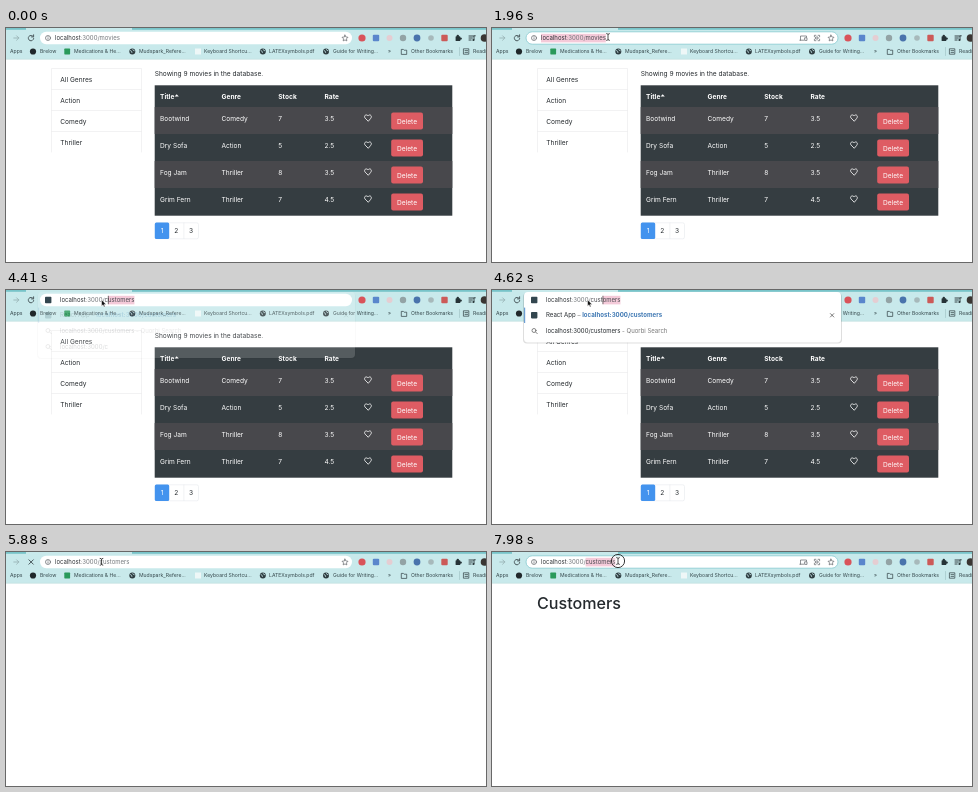
Animation of 480 by 234 pixels, one loop 8 s. Source, as an HTML page:

```html
<!DOCTYPE html>
<html lang="en">
<head>
<meta charset="utf-8">
<title>Movie list</title>
<style>
  html, body { margin: 0; width: 100%; height: 100%; overflow: hidden; background: #fff; }
  svg { display: block; width: 100%; height: 100%; }
  text { font-family: Inter, Roboto, sans-serif; fill: #24292d; white-space: pre; }
  .page text { font-size: 6.6px; }
  .page .light { fill: #fff; }
  .page .head { fill: #fff; font-weight: 700; }
  .marks text { font-size: 5.1px; fill: #34464a; }
  .omni text { font-size: 6px; }
  .omni .best { font-size: 6.1px; }
  .line { fill: none; stroke-linecap: round; stroke-linejoin: round; }
</style>
</head>
<body>
<svg viewBox="0 0 480 234" preserveAspectRatio="none">
  <rect width="480" height="234" fill="#fff"/>
  <g id="movies" class="page"></g>
  <text id="heading" x="45" y="57.2" font-size="16.1" font-weight="500">Customers</text>
  <g id="chrome" class="marks"></g>
  <g id="popup" class="omni"></g>
  <g class="omni">
    <rect id="pill" x="34" y="3.8" width="312" height="12.4" rx="6.2" fill="#fff" stroke-width=".9"/>
    <g id="info" class="line" stroke="#5f6368" stroke-width=".7"><circle cx="42" cy="10" r="2.5"/><path d="M42 9.8v1.4M42 8.6v.1"/></g>
    <rect id="favicon" x="39" y="6.8" width="6.4" height="6.4" rx=".8" fill="#33464f"/>
    <rect id="selection" y="5.8" height="8.6" fill="#f4cad9"/>
    <text id="url" y="12.1"><tspan fill="#303438">localhost</tspan><tspan fill="#73777b">:3000/</tspan><tspan id="path"></tspan></text>
    <path id="caret" class="line" stroke="#222" stroke-width=".6"/>
    <g id="pageIcons" class="line" stroke="#5f6368" stroke-width=".7">
      <path d="M308.5 12.2V8h6v1.2M307.8 12.2h3.8M313 9.8h2v2.6h-2z"/>
      <path d="M322.4 8.8V7.3h1.5M326.1 7.3h1.5v1.5M327.6 11.2v1.5h-1.5M323.9 12.7h-1.5v-1.5M324 9h2v2h-2z"/>
    </g>
    <path id="star" class="line" stroke="#5f6368" stroke-width=".7" d="M339 7.1l.9 1.9 2.1.3-1.5 1.5.3 2.1-1.8-1-1.8 1 .3-2.1-1.5-1.5 2.1-.3z"/>
  </g>
  <g class="line" stroke="#4b5a5e" stroke-width="1">
    <path id="reload" d="M27.2 8.5a2.7 2.7 0 1 0 .5 2M27.6 6.8v2.1h-2.1"/>
    <path id="stop" d="M22.9 7.8l4.4 4.4M27.3 7.8l-4.4 4.4"/>
  </g>
  <g id="pointer">
    <circle id="ring" r="6.6" fill="#fff" fill-opacity=".15" stroke="#222" stroke-width=".9"/>
    <path id="beam" class="line" stroke="#222" stroke-width=".8" d="M-1.4 -3.4q1.4 0 1.4 .8v5.2q0 .8 -1.4 .8M1.4 -3.4q-1.4 0 -1.4 .8M1.4 3.4q-1.4 0 -1.4 -.8"/>
    <path id="arrow" fill="#111" stroke="#fff" stroke-width=".5" d="M0 0v6.4l1.5-1.4 1 2.3 1.1-.5-1-2.2h2.1z"/>
  </g>
</svg>
<script>
const LOOP = 8000;
const $ = id => document.getElementById(id);
const text = (x, y, s, attrs = '') => `<text x="${x}" y="${y}" ${attrs}>${s}</text>`;
const rect = (x, y, w, h, fill, attrs = '') =>
  `<rect x="${x}" y="${y}" width="${w}" height="${h}" fill="${fill}" ${attrs}/>`;
const dot = (x, y, r, fill) => `<circle cx="${x}" cy="${y}" r="${r}" fill="${fill}"/>`;
const line = (d, color, width = .7) =>
  `<path class="line" d="${d}" stroke="${color}" stroke-width="${width}"/>`;

function moviesPage() {
  const rows = [
    ['Bootwind', 'Comedy', 7, 3.5], ['Dry Sofa', 'Action', 5, 2.5],
    ['Fog Jam', 'Thriller', 8, 3.5], ['Grim Fern', 'Thriller', 7, 4.5],
  ];
  const columns = [154, 215.5, 272.3, 318.5];
  let s = line('M45.5 124V40.5H135.5V124M45.5 61.5h90M45.5 82.5h90M45.5 103.5h90', '#ecedee');
  ['All Genres', 'Action', 'Comedy', 'Thriller'].forEach((genre, i) => s += text(54.3, 53.6 + 21 * i, genre));
  s += text(148.7, 48.3, 'Showing 9 movies in the database.');
  s += rect(148.7, 57.3, 297.6, 130.4, '#353d41');
  ['Title', 'Genre', 'Stock', 'Rate'].forEach((name, i) => s += text(columns[i], 70.9, name, 'class="head"'));
  s += '<path d="M168.6 68.6l2.1-2.3 2.1 2.3z" fill="#fff"/>';
  rows.forEach((row, i) => {
    const y = 79 + 27 * i;
    if (i % 2 === 0) s += rect(148.7, y, 297.6, 27, '#48484c');
    row.forEach((cell, c) => s += text(columns[c], y + 13.8, cell, 'class="light"'));
    s += line(`M362 ${y + 14}l-2.9-2.9c-1.8-2.3 1.2-4.5 2.9-2.2c1.7-2.3 4.7-.1 2.9 2.2z`, '#fff', .8);
    s += rect(385.2, y + 5.5, 31.8, 17, '#de5c63', 'rx="2"');
    s += text(401, y + 16.5, 'Delete', 'class="light" text-anchor="middle"');
  });
  s += rect(149.3, 194.8, 43.2, 16, '#fff', 'rx="1.8" stroke="#e6e9ec" stroke-width=".6"');
  s += line('M177.9 195v15.6', '#e6e9ec', .6);
  s += rect(148.8, 194.5, 14.4, 16.4, '#4393ee', 'rx="1.5"');
  [156, 170.3, 185].forEach((x, i) =>
    s += text(x, 205.2, i + 1, `text-anchor="middle" ${i ? '' : 'class="light"'}`));
  return s;
}

function browserFrame() {
  const ink = '#2f3d41';
  let s = rect(0, 0, 480, 31.3, '#c8e9eb') + rect(0, 0, 20, 1.8, '#78c4c9') + rect(126, 0, 354, 1.8, '#78c4c9');
  s += line('M0 31.2h480', '#b4d4d6', .5);
  s += line('M7.8 10h5M10.6 7.8l2.2 2.2-2.2 2.2', '#93acaf', .8);
  const bookmarks = [
    [4, 'Apps'], [34, 'Brelow'], [68, 'Medications &amp; He...'], [133, 'Mudspark_Refere...'],
    [198, 'Keyboard Shortcu...'], [263, 'LATEXsymbols.pdf'], [327, 'Guide for Writing...'],
    [382, '»'], [405, 'Other Bookmarks'], [467, 'Reading List'],
  ];
  bookmarks.forEach(([x, label]) => s += text(x, 25.4, label));
  s += dot(27, 23.5, 3.1, '#20282b') + rect(58.3, 20.6, 5.8, 5.8, '#2a9a5b', 'rx=".6"');
  s += rect(189, 20.5, 6, 6, '#eef7f7');
  for (const x of [126.3, 256.8, 320]) {
    s += dot(x, 23.5, 3, ink);
    s += line(`M${x - 1.8} 22.5q1.6 .3 1.5 2M${x + .4} 21.6q.2 1.2 1.5 1.2`, '#c8e9eb', .8);
  }
  s += line('M395.3 26V21.4h2l.8 .8h2.6V26z', ink) + line('M453.5 19.5v8', '#9dbfc2', .6);
  s += line('M457.8 20.8h5v5.4h-5zM459 22.6h2.6M459 24.4h2.6', ink, .7);

  // extension buttons
  s += dot(356, 10, 3.6, '#d9535a') + rect(366.8, 6.8, 6.4, 6.4, '#5a86cc', 'rx="1"');
  s += dot(383.5, 10, 3, '#e5cdd2') + dot(397, 10, 3.2, '#93a3a5') + dot(411, 10, 3.4, '#4a73ac');
  s += dot(425, 10, 2.8, '#a7b9bb') + rect(441.2, 6.8, 6.4, 6.4, '#cc5a58', 'rx="1" transform="translate(-5.9 0)"');
  s += rect(449.6, 8.3, 4.7, 4.7, '#263337', 'rx=".6"') + dot(451.8, 8, 1.2, '#263337') + dot(454.6, 10.6, 1.2, '#263337');
  s += line('M463 8h4.6M463 10h3.4M463 12h2.2M468 12V7.8h1.3', '#263337', .9) + dot(467.4, 12, 1, '#263337');
  s += dot(478.5, 10, 3.8, '#3a3532');
  return s;
}

function suggestions() {
  const address = 'localhost:3000/customers';
  const search = y => line(`M43.7 ${y + 1.6}l1.6 1.6`, '#666', .8) +
    `<circle class="line" cx="42" cy="${y}" r="2" stroke="#666" stroke-width=".8"/>`;
  return `<rect id="shadow" x="31" y="3" width="319" rx="4" fill="#000" opacity=".13"/>
    <rect id="sheet" x="32" y="2" width="317" rx="4" fill="#fff"/>` +
    rect(32, 17.6, 1.2, 15.4, '#6d9fd4') + rect(39, 22, 6.4, 6.4, '#33464f', 'rx=".8"') +
    `<text class="best" x="54" y="27.3">React App<tspan fill="#777"> – </tspan><tspan fill="#3f78b3" font-weight="700">${address}</tspan></text>` +
    line('M338.4 23.6l3.4 3.4M341.8 23.6l-3.4 3.4', '#444') + search(40.5) +
    `<text x="54" y="43.1">${address}<tspan fill="#777"> - Quorbi Search</tspan></text>` +
    `<g id="thirdRow">${search(56.5)}${text(54, 59.1, 'localhost:3000/c')}</g>`;
}

$('movies').innerHTML = moviesPage();
$('chrome').innerHTML = browserFrame();
$('popup').innerHTML = suggestions();

const show = (id, on) => $(id).style.display = on ? '' : 'none';
const within = (t, ...spans) => spans.some(([from, to]) => t >= from && t < to);
const clamp = v => Math.min(1, Math.max(0, v));

const pointerStops = [
  [70, 150, -14], [840, 116, 9], [2380, 116, 9], [2870, 95.5, 9.8],
  [6510, 95.5, 9.8], [7280, 126, 9], [LOOP, 126, 9],
];
function pointerAt(t) {
  const next = Math.max(1, pointerStops.findIndex(stop => stop[0] >= t));
  const [t0, x0, y0] = pointerStops[next - 1], [t1, x1, y1] = pointerStops[next];
  const p = clamp((t - t0) / (t1 - t0)), ease = p * p * (3 - 2 * p);
  return [x0 + (x1 - x0) * ease, y0 + (y1 - y0) * ease];
}

function render(t) {
  const typing = within(t, [4200, 5670]);
  const typed = t < 4480 ? 1 : Math.min(9, 2 + Math.floor((t - 4480) / 70));
  const [px, py] = pointerAt(t);

  show('movies', t < 5740);
  show('heading', t >= 6020);
  const loading = within(t, [5670, 6160]);
  show('stop', loading);
  show('reload', !loading);

  // address field
  const path = t < 4200 ? 'movies' : 'customers';
  if ($('path').textContent !== path) $('path').textContent = path;
  const url = $('url');
  const left = typing ? 54 : 49;
  url.setAttribute('x', left);
  const end = url.getNumberOfChars();
  const charX = i => i < end ? url.getStartPositionOfChar(i).x : url.getEndPositionOfChar(end - 1).x;
  const pathX = charX(15), endX = charX(end), typedX = charX(Math.min(end, 15 + typed));
  let from = endX;
  if (within(t, [1680, 2240], [7490, 7700])) from = left;
  else if (within(t, [2380, 4200])) from = Math.max(pathX, Math.min(endX, px));
  else if (typing) from = typedX;
  else if (t >= 7840) from = pathX;
  $('selection').setAttribute('x', from);
  $('selection').setAttribute('width', Math.max(0, endX - from));
  $('path').style.fill = from < endX ? '#4a4a50' : '#73777b';
  show('caret', typing || within(t, [2240, 2380], [7700, 7840]));
  $('caret').setAttribute('d', `M${(typing ? typedX : endX) + .3} 6.2v7.6`);
  show('info', !typing);
  show('favicon', typing);
  show('star', !typing);
  const focused = within(t, [1680, 4200], [7490, LOOP]);
  show('pageIcons', focused);
  $('pill').setAttribute('stroke', focused ? '#8fcfd4' : 'none');

  // suggestion list
  const open = within(t, [4340, 5600]);
  const tall = t < 4620;
  show('popup', open);
  $('popup').setAttribute('opacity', clamp((t - 4340) / 70 * .15 + Math.max(0, t - 4410) / 300));
  $('sheet').setAttribute('height', tall ? 66 : 50.5);
  $('shadow').setAttribute('height', tall ? 66 : 50.5);
  show('thirdRow', tall);

  $('pointer').setAttribute('transform', `translate(${px} ${py})`);
  const arrow = within(t, [3290, 5600]);
  show('arrow', arrow);
  show('beam', !arrow);
  show('ring', within(t, [1120, 1680], [2170, 2240], [2310, 2870], [7350, 7490], [7630, 7700], [7840, LOOP]));
}

const start = performance.now();
function tick() {
  render((performance.now() - start) % LOOP);
  requestAnimationFrame(tick);
}
tick();
</script>
</body>
</html>
```
